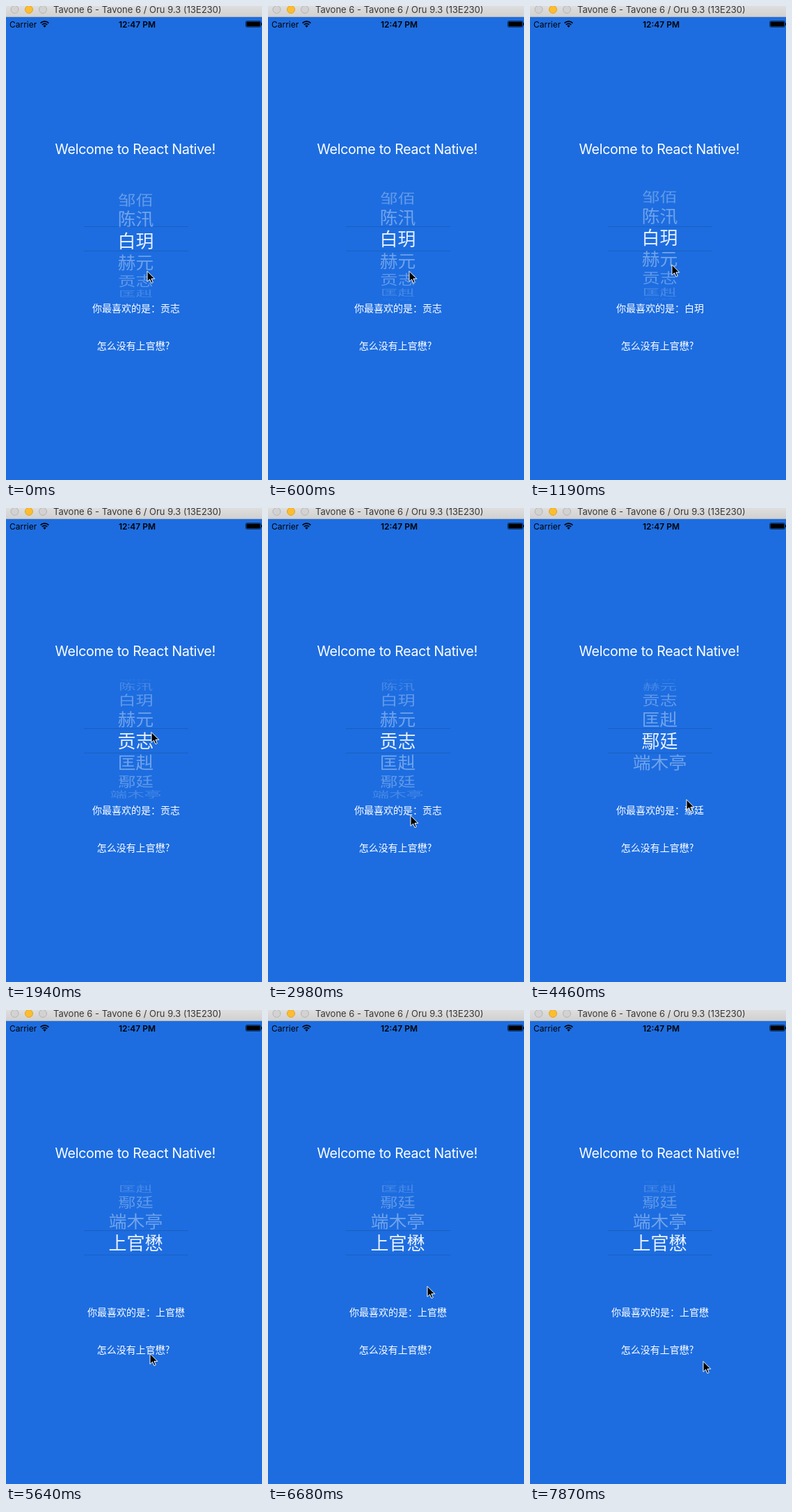
Animation of 368 by 682 pixels, one loop 8 s. Source, as an HTML page:

```html
<!DOCTYPE html>
<html lang="zh-CN">
<head>
<meta charset="utf-8">
<title>Picker</title>
<style>
html, body { margin: 0; height: 100%; overflow: hidden; background: #1d6de0; }
svg { display: block; }
text { font-family: Inter, "Noto Sans CJK SC", "Noto Sans CJK", sans-serif; fill: #fff; }
.zh { font-family: "Noto Sans CJK SC", "Noto Sans CJK", sans-serif; font-size: 14px; text-anchor: middle; }
.row { font-size: 26px; }
.status { font-size: 12px; fill: #000; }
</style>
</head>
<body>
<svg width="368" height="682" viewBox="0 0 368 682">
  <defs>
    <linearGradient id="bar" x2="0" y2="1">
      <stop stop-color="#dedede"/><stop offset="1" stop-color="#d0d0d0"/>
    </linearGradient>
    <clipPath id="inside"><path d="M0 318H368V352H0Z"/></clipPath>
    <clipPath id="outside"><path d="M0 200H368V318H0ZM0 352H368V480H0Z"/></clipPath>
  </defs>
  <rect width="368" height="682" fill="#1d6de0"/>

  <rect width="368" height="16" fill="url(#bar)"/>
  <rect y="15" width="368" height="1" fill="#b8b8b8"/>
  <g fill="#d2d2d2" stroke="#b4b4b4">
    <circle cx="12.5" cy="5" r="5.5"/>
    <circle cx="33" cy="5" r="5.5" fill="#fdbd2f" stroke="#dfa32b"/>
    <circle cx="53" cy="5" r="5.5"/>
  </g>
  <text x="68" y="10" font-size="13" style="fill:#383838">Tavone 6 - Tavone 6 / Oru 9.3 (13E230)</text>

  <text class="status" x="5" y="31">Carrier</text>
  <g fill="none" stroke="#000" stroke-width="1.7">
    <path d="M49.6 24.6A8.4 8.4 0 0 1 61.4 24.6M51.8 27A5.2 5.2 0 0 1 59.2 27"/>
    <path d="M53.4 28.6A3 3 0 0 1 57.6 28.6L55.5 31Z" fill="#000" stroke="none"/>
  </g>
  <text class="status" x="188.5" y="31" font-weight="600" text-anchor="middle">12:47 PM</text>
  <rect x="344.5" y="21.5" width="22" height="9" rx="2" fill="none" stroke="#000" stroke-opacity=".5"/>
  <rect x="345.5" y="22.5" width="20" height="7" rx="1" fill="#000"/>
  <rect x="367" y="24.5" width="1" height="3" fill="#000"/>

  <text x="185.8" y="212.7" font-size="19.6" letter-spacing="-.3" text-anchor="middle">Welcome to React Native!</text>

  <g id="dim" clip-path="url(#outside)"></g>
  <g id="lit" clip-path="url(#inside)"></g>
  <path d="M112 317.5H262M112 352.5H262" stroke="#000" stroke-opacity=".14"/>

  <text class="zh" id="label" x="187" y="439.7"></text>
  <text class="zh" x="183" y="494">怎么没有上官懋?</text>

  <path id="cursor" d="M0 0V15L3.6 11.7L6 17.2L8.3 16.2L6 10.9H10.8Z" fill="#000" stroke="#fff"/>
</svg>
<script>
const names = ['邹佰', '陈汛', '白玥', '赫元', '贡志', '匡赳', '鄢廷', '端木亭', '上官懋'];
const LOOP = 8000, STEP = 148.4;        // the picture advances in steps
const RADIUS = 88, ANGLE = 0.361;       // picker wheel
const CX = 186.5, CY = 335;
const TAP = 35;                         // the last name joins the list

// wheel turns: start step, length, rows
const turns = [[0, 5, 0.1], [7.5, 4.5, 2], [22, 4.5, 2], [TAP, 2, 2]];
// pointer stops: step, x, y
const stops = [[7, 203, 381], [11, 209, 322], [14, 209, 322], [18, 224, 492], [22, 186, 392],
  [25, 196, 339], [30, 225, 419], [33, 207, 494], [41, 207, 494], [45, 229, 397]];

const $ = id => document.getElementById(id);

function ease(x) {
  x = Math.min(1, Math.max(0, x));
  return x * x * (3 - 2 * x);
}

function pointerAt(k) {
  if (k >= 53) return [249, 505];
  let [, x, y] = stops[0];
  for (let i = 1; i < stops.length; i++) {
    const [a, ax, ay] = stops[i - 1], [b, bx, by] = stops[i];
    const f = ease((k - a) / (b - a));
    x += (bx - ax) * f;
    y += (by - ay) * f;
  }
  return [x, y];
}

function addRows(parent) {
  return names.map(name => {
    const row = document.createElementNS('http://www.w3.org/2000/svg', 'text');
    row.setAttribute('class', 'zh row');
    row.setAttribute('y', 9.8);
    row.textContent = name;
    parent.append(row);
    return row;
  });
}
const dim = addRows($('dim')), lit = addRows($('lit'));

function place(row, angle, alpha) {
  const c = Math.cos(angle);
  const sx = 840 / (840 + RADIUS * (1 - c));
  row.setAttribute('transform', `translate(${CX} ${CY + RADIUS * Math.sin(angle)}) scale(${sx} ${c})`);
  row.setAttribute('opacity', alpha);
}

function draw(now) {
  const k = Math.floor(now % LOOP / STEP);
  const pos = turns.reduce((sum, [start, len, rows]) => sum + rows * ease((k - start) / len), 1.9);
  names.forEach((_, i) => {
    const angle = (i - pos) * ANGLE;
    const shown = (i < 8 || k > TAP) && Math.abs(angle) < Math.PI / 2;
    place(dim[i], angle, shown ? 0.4 * Math.cos(angle) : 0);
    place(lit[i], angle, shown ? 0.9 : 0);
  });

  // the label follows one step after each turn ends
  const done = turns.filter(([start, len]) => k >= start + len + 1).length;
  $('label').textContent = '你最喜欢的是：' + names[done ? 2 * done : 4];

  const [x, y] = pointerAt(k);
  $('cursor').setAttribute('transform', `translate(${x} ${y + 0.5})`);
  $('cursor').setAttribute('visibility', k >= 46 && k < 53 ? 'hidden' : 'visible');
  requestAnimationFrame(draw);
}
requestAnimationFrame(draw);
</script>
</body>
</html>
```
